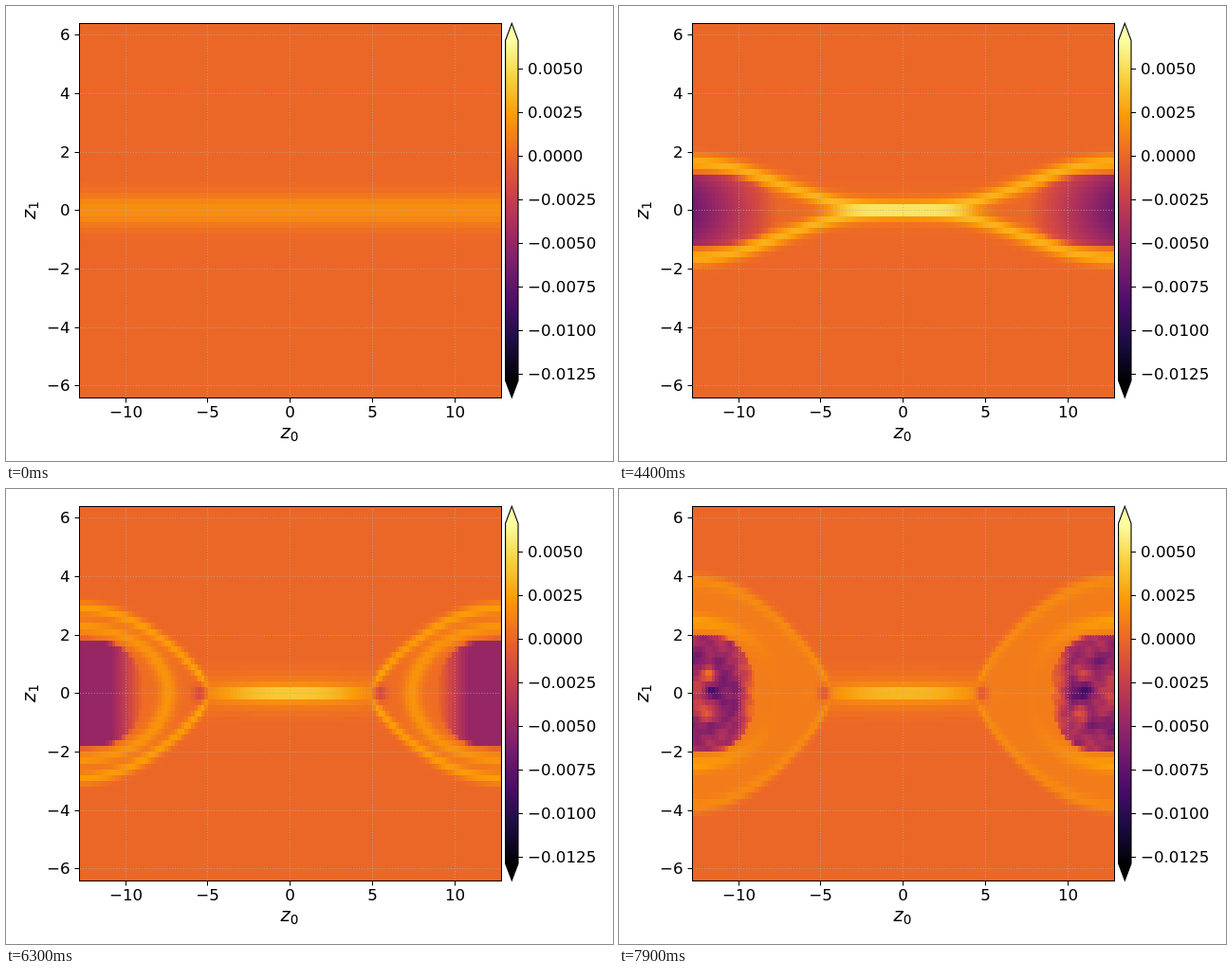
These frames come from a looping animation (640 by 480 pixels, 8000 ms). An HTML page with a canvas:

```html
<!DOCTYPE html>
<html lang="en">
<head>
<meta charset="utf-8">
<title>Current sheet</title>
<style>
  html, body { margin: 0; width: 100%; height: 100%; overflow: hidden; background: #fff; }
  canvas { position: absolute; left: 77.4px; top: 18.3px; width: 444.9px; height: 394.8px; image-rendering: pixelated; }
  svg { position: absolute; left: 0; top: 0; }
  text { font: 16.67px "DejaVu Sans", sans-serif; }
  .name { font-size: 19.44px; font-style: oblique; }
  .sub { font-size: 13.6px; font-style: normal; }
</style>
</head>
<body>
<canvas id="field" width="128" height="64"></canvas>
<svg id="axes" width="640" height="480" viewBox="0 0 640 480">
  <defs><linearGradient id="scale" gradientUnits="userSpaceOnUse" x1="0" y1="395" x2="0" y2="36"></linearGradient></defs>
  <path d="M526.6 36.3L533.3 18.4L540 36.3V395.1L533.3 413L526.6 395.1Z" fill="url(#scale)" stroke="#000" stroke-width="1.1"/>
  <g id="grid" stroke="#b0b0b0" stroke-width="1" stroke-dasharray="1.11 1.83" opacity=".65"></g>
  <rect x="77.5" y="18.5" width="445" height="395" fill="none" stroke="#000"/>
  <g id="ticks" stroke="#000"></g>
  <g id="labels"></g>
  <text class="name" x="289.5" y="456">z<tspan class="sub" dy="3">0</tspan></text>
  <text class="name" transform="translate(31 225) rotate(-90)">z<tspan class="sub" dy="3">1</tspan></text>
</svg>
<script>
const INFERNO = ['000004', '1b0c41', '4a0c6b', '781c6d', 'a52c60', 'cf4446', 'ed6925', 'fb9b06', 'f7d13d', 'fcffa4'];
const LAST = INFERNO.length - 1;
const RGB = INFERNO.map(h => [0, 2, 4].map(i => parseInt(h.substr(i, 2), 16)));
const LOW = -12.88, HIGH = 6.63, EDGE = 12.8, LOOP = 8000, STEP = 100;
const $ = id => document.getElementById(id);
const sat = v => Math.max(0, Math.min(1, v));
const bell = v => Math.exp(-v * v);
const ramp = (t, from, to) => sat((t - from) / (to - from));

// The sheet thins and opens until 5.2 s, then islands burst out and settle.
function stateAt(t) {
  const grow = ramp(t, 0, 5.2), burst = ramp(t, 5.2, 6.3), settle = ramp(t, 6.3, 7.9);
  const eye = ramp(t, 6.9, 7.9);
  return {
    t, burst, settle, eye,
    sheet: 1.8 - 1.5 * ramp(t, 0, 2) + .6 * burst,
    sheetWidth: .55 + .15 * grow,
    jet: 2.3 * ramp(t, 0, 1.4) + .9 * burst - .7 * settle,
    jetLength: 6.5 - 3.1 * grow + .7 * burst,
    top: .37 * t + .95 * ramp(t, 5.2, 7),
    start: 4.8 * burst - .5 * eye,
    power: 2.5 - 1.75 * burst,
    ridge: 3.65 * grow - 1.35 * burst - .8 * settle,
    width: .55 - .33 * grow,
    echo: bell((t - 7.1) / .4),
    depth: 7.2 * Math.sin(Math.PI / 2 * grow) ** 2 - 2 * burst,
    coreLength: 7.5 - 2.6 * grow - burst,
    coreTop: Math.min(2.1, Math.max(.05, .32 * t - .1)),
    island: .9 * ramp(t, 6, 7.1),
    ring: 1.7 * burst,
    mark: 2.4 * ramp(t, 4.4, 5.2),
    markAt: 5.5 - .7 * eye
  };
}

function swirl(s, x, y, dx) {
  const rho = Math.hypot(dx / (.6 * s.coreLength), y / (.55 * s.coreTop));
  const grain = Math.sin(4.1 * x + 2 * Math.sin(3.3 * y) + 3.3 * s.t) * Math.cos(5.2 * y + Math.sin(2.7 * x));
  const cx = x < 0 ? -11.8 : 10.8;
  const eyes = bell(Math.hypot((x - cx) / .5, (Math.abs(y) - .7) / .3))
    - bell(Math.hypot((x - cx - .2) / .5, (y - .05) / .25));
  return s.settle * (1.6 * bell(rho / .6) - 1.8 * bell((rho - 1) / .3) + grain) + 4.5 * s.eye * eyes;
}

function valueAt(s, x, y) {
  const u = Math.abs(x), v = Math.abs(y), dx = EDGE - u;
  const along = sat((u - s.start) / (EDGE - s.start));
  const h = s.top * Math.sin(Math.PI / 2 * along) ** s.power;
  const inside = sat((h - v) / .3);

  let f = s.sheet * bell(v / s.sheetWidth) * (1 - inside) + s.island * inside;
  f += s.jet * Math.exp(-((u / s.jetLength) ** 3) - (v - .1) / .17);
  const arcs = bell((v - h) / s.width) + .8 * s.echo * bell((v - .78 * h) / s.width);
  f += s.ridge * arcs * sat(1 - s.burst + (u - s.start) / .6);

  const side = dx / 5.4;
  const loop = Math.hypot(side, v / (s.coreTop + .35));
  f += s.ring * bell((loop - 1) / .1) * (1 - s.settle * sat(side));

  const e = dx / s.coreLength;
  if (e < 1) {
    const rim = sat((s.coreTop * Math.sqrt(1 - e ** 3) - v) / .15);
    const body = s.depth * sat((1 - e) * (1 + s.burst + s.settle)) * (1 - .4 * (1 - s.burst) * (v / s.coreTop) ** 2);
    f += rim * (swirl(s, x, y, dx) - body);
  }
  return f - s.mark * bell((u - s.markAt) / .4) * bell(v / .25);
}

const ctx = $('field').getContext('2d');
const image = ctx.createImageData(128, 64);

function draw(t) {
  const state = stateAt(t / 1000);
  for (let j = 0, k = 0; j < 64; j++) {
    for (let i = 0; i < 128; i++, k += 4) {
      const f = valueAt(state, (i - 63.5) * .2, (31.5 - j) * .2);
      const q = sat((f - LOW) / (HIGH - LOW)) * LAST, n = Math.min(LAST - 1, Math.floor(q));
      for (let c = 0; c < 3; c++) image.data[k + c] = RGB[n][c] + (RGB[n + 1][c] - RGB[n][c]) * (q - n);
      image.data[k + 3] = 255;
    }
  }
  ctx.putImageData(image, 0, 0);
}

function add(parent, tag, attrs, text) {
  const el = document.createElementNS('http://www.w3.org/2000/svg', tag);
  for (const key in attrs) el.setAttribute(key, attrs[key]);
  if (text !== undefined) el.textContent = text;
  $(parent).appendChild(el);
}
const line = (parent, x1, y1, x2, y2) => add(parent, 'line', { x1, y1, x2, y2 });
const label = (x, y, anchor, text) => add('labels', 'text', { x, y, 'text-anchor': anchor }, String(text).replace('-', '\u2212'));

INFERNO.forEach((hex, i) => add('scale', 'stop', { offset: i / LAST, 'stop-color': '#' + hex }));
for (let n = -10; n <= 10; n += 5) {
  const x = Math.floor(299.85 + n * 17.38) + .5;
  line('grid', x, 413, x, 18);
  line('ticks', x, 413.5, x, 418.5);
  label(x, 434, 'middle', n);
}
for (let n = -6; n <= 6; n += 2) {
  const y = Math.floor(215.7 - n * 30.84) + .5;
  line('grid', 78, y, 522, y);
  line('ticks', 72.5, y, 77.5, y);
  label(67.5, y + 5.5, 'end', n);
}
for (let i = 0; i < 8; i++) {
  const y = 66.5 + 46 * i;
  line('ticks', 540, y, 545, y);
  label(550, y + 5.5, 'start', (.005 - .0025 * i).toFixed(4));
}

const began = performance.now();
let shown = -1;
function tick() {
  const t = Math.floor((performance.now() - began) % LOOP / STEP) * STEP;
  if (t !== shown) draw(shown = t);
  requestAnimationFrame(tick);
}
tick();
</script>
</body>
</html>
```
